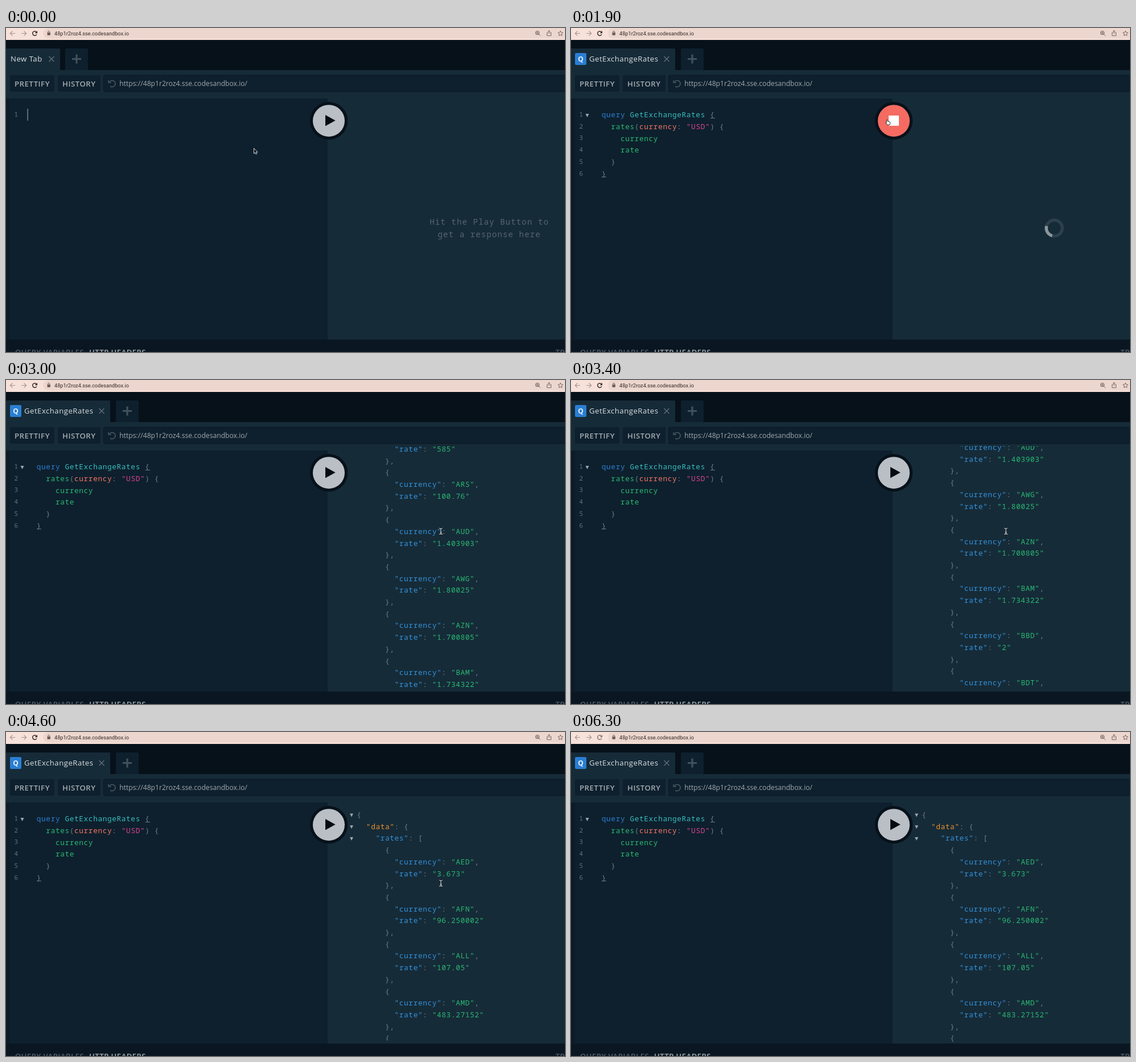
Recreate the animation shown at these times as an HTML page with a canvas. Size 982x570 px, loop 7000 ms.

```html
<!DOCTYPE html>
<html lang="en">
<head>
<meta charset="utf-8">
<title>Query playground</title>
<style>
  html, body { margin: 0; width: 100%; height: 100%; overflow: hidden; background: #08121b; }
  canvas { display: block; }
</style>
</head>
<body>
<canvas id="stage" width="982" height="570"></canvas>
<script>
const ctx = document.getElementById('stage').getContext('2d');
const LOOP = 7000, STEP = 100, PITCH = 20.7, CHAR = 8.28;
const SANS = '"Open Sans", sans-serif';
const MONO = '"Noto Sans Mono", monospace';
const PANEL = '#162b38', EDITOR = '#0e202d', DARK = '#07111a';
const BLUE = '#2a7ed3', TEAL = '#38bdc1', GREEN = '#29b973', CORAL = '#f77466',
      PINK = '#d64292', KEY = '#3393dc', ORANGE = '#e8912b', DIM = '#6f7d86';

const query = [
  ['query ', BLUE, 'GetExchangeRates ', TEAL, '{', DIM],
  ['  rates', GREEN, '(', DIM, 'currency', CORAL, ': ', DIM, '"USD"', PINK, ') {', DIM],
  ['    currency', GREEN],
  ['    rate', GREEN],
  ['  }', DIM],
  ['}', DIM]
];

const rates = {
  AED: '3.673', AFN: '96.250002', ALL: '107.05', AMD: '483.27152', ANG: '1.801829',
  AOA: '585', ARS: '100.76', AUD: '1.403903', AWG: '1.80025', AZN: '1.700805',
  BAM: '1.734322', BBD: '2', BDT: '85.804468', BGN: '1.7341'
};
const pair = (key, value, end) =>
  [`        "${key}"`, KEY, ': ', DIM, `"${value}"`, GREEN, end, DIM];
const response = [
  ['{', DIM],
  ['  "data"', ORANGE, ': {', DIM],
  ['    "rates"', KEY, ': [', DIM]
];
for (const [code, rate] of Object.entries(rates)) {
  response.push(['      {', DIM], pair('currency', code, ','), pair('rate', rate, ''), ['      },', DIM]);
}

// Keyframes: [time, ...values]
const scrollKeys = [[2600, 0], [2700, 60], [2800, 230], [2900, 410], [3000, 541.6], [3100, 612],
  [3200, 655], [3400, 689.4], [3500, 698], [3600, 703], [3700, 703], [3800, 610],
  [3900, 380], [4000, 170], [4100, 50], [4200, 0]];
const pointerKeys = [[800, 435, 211], [1000, 470, 200], [1200, 530, 173], [1400, 557, 166],
  [2000, 557, 166], [2200, 670, 222], [2400, 764, 266], [5300, 764, 266], [5500, 660, 440],
  [5600, 599, 540], [5800, 599, 540], [6000, 592, 580]];

function track(keys, t) {
  const next = keys.findIndex(key => key[0] > t);
  if (next === 0) return keys[0].slice(1);
  if (next < 0) return keys[keys.length - 1].slice(1);
  const a = keys[next - 1], b = keys[next], k = (t - a[0]) / (b[0] - a[0]);
  return a.slice(1).map((v, i) => v + (b[i + 1] - v) * k);
}

function rect(x, y, w, h, fill, radius = 0) {
  ctx.fillStyle = fill;
  ctx.beginPath();
  ctx.roundRect(x, y, w, h, radius);
  ctx.fill();
}

function disc(x, y, r, fill) {
  ctx.fillStyle = fill;
  ctx.beginPath();
  ctx.arc(x, y, r, 0, 7);
  ctx.fill();
}

function arc(x, y, r, from, to, color, width) {
  ctx.strokeStyle = color;
  ctx.lineWidth = width;
  ctx.beginPath();
  ctx.arc(x, y, r, from, to);
  ctx.stroke();
}

function text(str, x, y, font, fill, spacing = 0, align = 'left') {
  ctx.font = font;
  ctx.letterSpacing = spacing + 'px';
  ctx.textAlign = align;
  ctx.fillStyle = fill;
  ctx.fillText(str, x, y);
}

function stroke(d, color, width = 1) {
  ctx.strokeStyle = color;
  ctx.lineWidth = width;
  ctx.stroke(new Path2D(d));
}

function shape(d, fill) {
  ctx.fillStyle = fill;
  ctx.fill(new Path2D(d));
}

function codeLine(parts, x, y) {
  for (let i = 0; i < parts.length; i += 2) {
    text(parts[i], x, y, '12.8px ' + MONO, parts[i + 1], 0.6);
    x += parts[i].length * CHAR;
  }
}

const foldMark = (x, y) => shape(`M${x - 3} ${y - 2.5}h6l-3 6z`, '#9ca6ac');

function browserBar(t) {
  const ink = '#6d5c56', soft = '#a3928d';
  rect(0, 0, 982, 21, '#f7e1d9');
  rect(65, 0, 940, 18.5, '#ecd6cd', 9);
  stroke('M16 9.5H7.5M11.5 5.3L7.3 9.5L11.5 13.7', soft, 1.1);
  stroke('M27 9.5H35.5M31.5 5.3L35.7 9.5L31.5 13.7', soft, 1.1);
  const reload = t < 6300 ? '#2d2422' : '#85756f';
  arc(50.5, 9.5, 3.8, 0.5, 5.5, reload, 1.4);
  shape('M55 5v4.3h-4.3z', reload);
  rect(72.5, 8, 5.4, 4.8, ink, 0.8);
  stroke('M73.7 8V6.8a1.5 1.5 0 0 1 3 0V8', ink);
  text('48p1r2roz4.sse.codesandbox.io', 85, 12.6, '9.2px Roboto, sans-serif', '#352b29');
  arc(933.5, 8.5, 3, 0, 7, ink, 1.1);
  stroke('M935.8 10.8l3 3M932 8.5h3M933.5 7v3', ink, 0.9);
  stroke('M952.5 8h-2v5.6h7V8h-2M954 10.5V4.5M951.8 6.5L954 4.4l2.2 2.1', ink, 0.9);
  stroke('M974 5l1.3 2.9 3.1.3-2.4 2.1.7 3.1-2.7-1.6-2.7 1.6.7-3.1-2.4-2.1 3.1-.3z', ink, 0.9);
}

function tabsAndToolbar(named) {
  const width = named ? 183 : 95, add = width + (named ? 10 : 9);
  rect(0, 21, 982, 53, DARK);
  rect(0, 36, width, 38, PANEL, [0, 2, 0, 0]);
  rect(add, 36, 40, 38, EDITOR, [2, 2, 0, 0]);
  stroke(`M${add + 12} 54.5h16M${add + 20} 46.5v16`, '#42525d', 3.2);
  stroke(`M${width - 19.5} 50l9 9m0-9l-9 9`, '#65737c', 1.2);
  if (named) {
    rect(7, 44, 20, 21, BLUE, 2);
    text('Q', 17, 59, `bold 12px ${SANS}`, '#e8f0f6', 0, 'center');
  }
  text(named ? 'GetExchangeRates' : 'New Tab', named ? 32 : 8, 58.8, `13.15px ${SANS}`, '#dbe0e3', 0.5);

  rect(7, 83, 78, 29, EDITOR, 2);
  rect(91, 83, 75, 29, EDITOR, 2);
  text('PRETTIFY', 15, 102.5, `600 13.2px ${SANS}`, '#a5aeb4', 0.5);
  text('HISTORY', 99, 102.5, `600 13.2px ${SANS}`, '#a5aeb4', 0.5);
  rect(171, 82.5, 815, 30, '#0a1822', 3);
  rect(172, 83.5, 813, 28, EDITOR, 2);
  arc(186.5, 98, 5.6, -2.6, 2.2, '#52616b', 1.4);
  stroke('M180.2 92v4.2h4.4', '#52616b', 1.3);
  text('https://48p1r2roz4.sse.codesandbox.io/', 199.3, 102.3, `12.15px ${SANS}`, '#a0a9af');
}

function editor(t, pasted) {
  rect(0, 124, 565, 424, EDITOR);
  rect(0, 124, 6, 424, '#0c1b27');
  const lines = pasted ? query : [[]];
  lines.forEach((parts, i) => {
    const y = 157.3 + i * PITCH;
    text(i + 1, 21, y - 1.3, '11px ' + MONO, '#64727b', 0, 'right');
    codeLine(parts, 53.8, y);
  });
  if (pasted) {
    rect(245, 158, 8, 1, DIM);
    rect(54, 261.5, 8, 1, DIM);
  }
  if (t >= 700) foldMark(28.5, 153.5);
  if (t < 100) rect(37.5, 142, 1.2, 21, '#929ca2');
  if ((t >= 300 && t < 900) || t === 1400) rect(62, 246, 1.2, 21, '#929ca2');
}

function results(t) {
  if (t < 1500) {
    const font = '14px ' + MONO, color = 'rgba(255,255,255,.28)';
    text('Hit the Play Button to', 849, 346, font, color, 1.12, 'center');
    text('get a response here', 849, 368, font, color, 1.12, 'center');
  } else if (t < 2100) {
    const angle = Math.PI * (105 / 180 + 2 * (t - 1900) / 1100);
    arc(849, 352, 14, 0, 7, '#2d404c', 5.4);
    arc(849, 352, 14, angle, angle + Math.PI / 2, '#8b969d', 5.4);
  } else {
    const [scroll] = track(scrollKeys, t);
    const bottom = t >= 2700 && t < 5400 ? 543 : 548;
    ctx.save();
    ctx.beginPath();
    ctx.rect(566, 116, 416, bottom - 116);
    ctx.clip();
    response.forEach((parts, i) => {
      const y = 150 + i * PITCH - scroll;
      if (y < 100 || y > 570) return;
      codeLine(parts, 616.3, y);
      if (i < 3) foldMark(607, y - 4);
    });
    ctx.restore();
  }
}

function playButton(running) {
  disc(567, 163.2, 33.2, DARK);
  disc(567, 163.2, 28, running ? '#f56b62' : '#b9bfc5');
  if (running) rect(558, 154, 18, 18, '#fff');
  else shape('M561 153L578.7 162.8L561 172.6z', '#050b10');
}

function pointer(t) {
  const [x, y] = track(pointerKeys, t);
  ctx.save();
  ctx.translate(x, y);
  ctx.lineJoin = 'round';
  if (t < 1200) {
    const d = 'M.5 .5V10L2.7 8L4 11L5.6 10.3L4.3 7.3H7z';
    shape(d, '#0a0f14');
    stroke(d, '#e4e7e9', 0.9);
  } else if (t < 2200) {
    const d = 'M-2.5 -4.5q1.3-.8 1.6.6l.6 2.2 3.2.7q1 .3.8 1.6l-.7 3.9h-4.2l-2.6-3.4q-.6-1.2 1-1z';
    shape(d, '#fff');
    stroke(d, '#1a1517', 0.9);
  } else {
    const d = 'M-3 -5.2Q0 -5.2 0 -3.2Q0 -5.2 3 -5.2M0 -3.5V4M-3 5.2Q0 5.2 0 3.2Q0 5.2 3 5.2M-1.7 1.7H1.7';
    stroke(d, '#0a0f14', 2.4);
    stroke(d, '#dfe3e5', 1.1);
  }
  ctx.restore();
}

function draw() {
  const t = Math.floor(performance.now() % LOOP / STEP) * STEP;
  const pasted = t >= 300;
  rect(0, 0, 982, 570, PANEL);
  browserBar(t);
  tabsAndToolbar(pasted);
  editor(t, pasted);
  results(t);
  rect(0, 548, 982, 22, '#0a1722');
  text('QUERY VARIABLES', 16, 575.3, `600 13px ${SANS}`, '#52606a', 0.5);
  text('HTTP HEADERS', 146, 575.3, `600 13px ${SANS}`, '#a5aeb4', 0.5);
  text('TRACING', 965.5, 575.3, `600 13px ${SANS}`, '#52606a', 0.5);
  playButton(t >= 1500 && t < 2100);
  pointer(t);
  requestAnimationFrame(draw);
}
draw();
</script>
</body>
</html>
```
